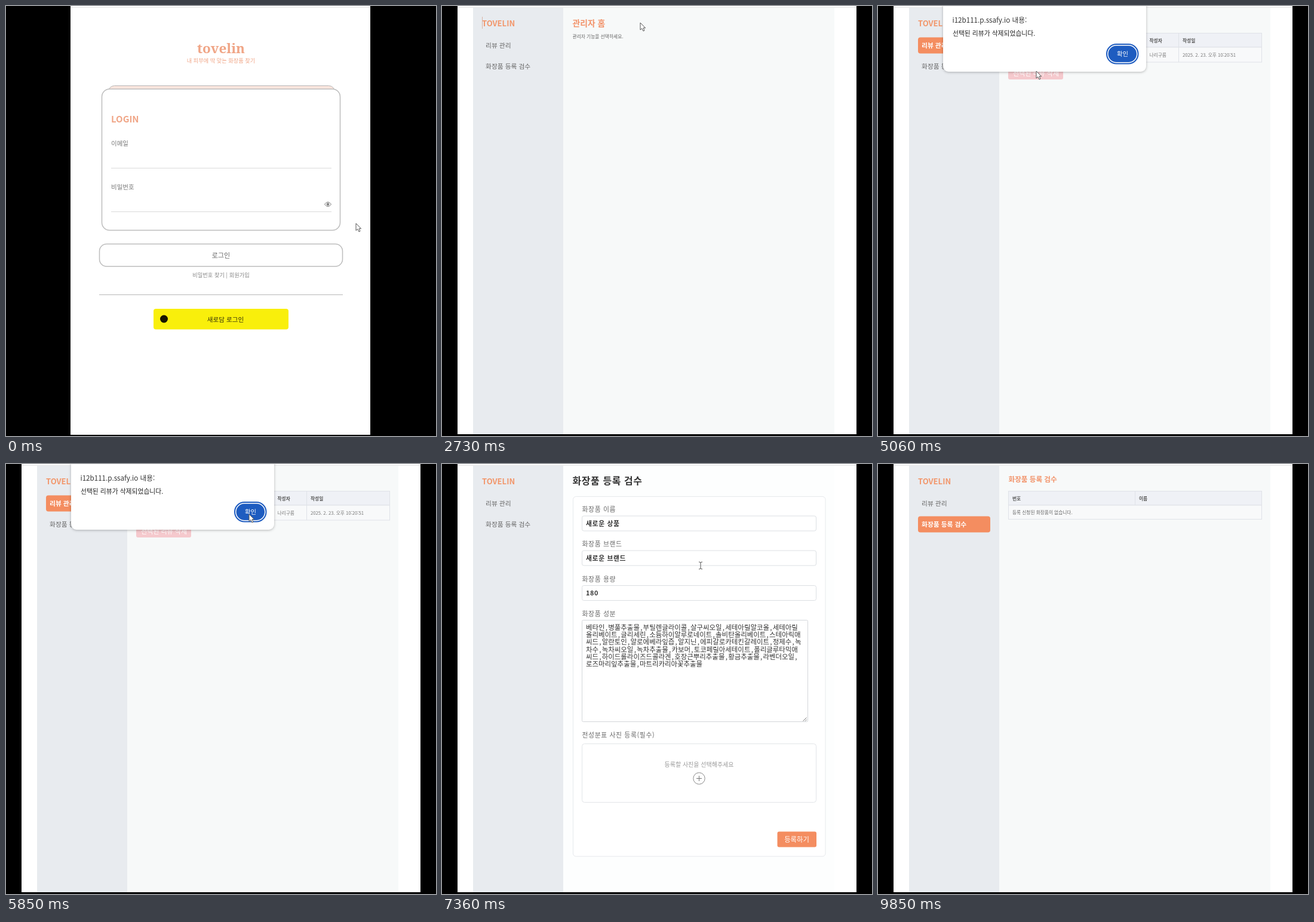
An HTML page that plays this animation: 720x720 px, repeating every 9.91 s.

```html
<!DOCTYPE html>
<html lang="ko">
<head>
<meta charset="utf-8">
<style>
html, body { margin: 0; width: 100%; height: 100%; overflow: hidden; background: #000; }
svg { display: block; width: 100vw; height: 100vh; }
text { font-family: "Noto Sans CJK KR", "Noto Sans CJK", "Noto Sans", sans-serif; white-space: pre; }
.logo { font-family: "Noto Serif", serif; font-weight: 900; }
.mono { font-family: "Noto Sans Mono CJK KR", "Noto Sans CJK KR", monospace; }
.b { font-weight: 700; }
.m { font-weight: 500; }
.c { text-anchor: middle; }
.wide { letter-spacing: .65px; }
.dialog { filter: drop-shadow(0 1px 2px #0004); }
</style>
</head>
<body>
<svg viewBox="0 0 720 720">
  <g id="page"></g>
  <g id="cursor"></g>
</svg>
<script>
const LOOP = 9910;
const ORANGE = '#f48d60', PEACH = '#f0a586', GRAY = '#bdbdbd', EDGE = '#dfe2e8';
const EMAIL = 'guest@mail.test';
const INGREDIENTS = [
  '베타인,병풀추출물,부틸렌글라이콜,살구씨오일,세테아릴알코올,세테아릴',
  '올리베이트,글리세린,소듐하이알루로네이트,솔비탄올리베이트,스테아릭애',
  '씨드,알란토인,알로에베라잎즙,알지닌,에피갈로카테킨갈레이트,정제수,녹',
  '차수,녹차씨오일,녹차추출물,카보머,토코페릴아세테이트,폴리글루타믹애',
  '씨드,하이드롤라이즈드콜라겐,호장근뿌리추출물,황금추출물,라벤더오일,',
  '로즈마리잎추출물,마트리카리아꽃추출물'
];
// time, x, y of the pointer tip
const TRACK = [
  [0, 586, 364], [55, 586, 364], [60, 579, 362], [290, 579, 362], [440, 339, 264],
  [2310, 339, 264], [2700, 332, 28], [2760, 332, 28], [3080, 105, 62], [3280, 105, 62],
  [3840, 228, 80], [4200, 228, 80], [4600, 265, 109], [5080, 265, 109], [5650, 407, 84],
  [6020, 407, 84], [6420, 110, 97], [6640, 110, 97], [6940, 300, 78], [7080, 300, 78],
  [7340, 433, 170], [7650, 433, 170], [8540, 594, 624], [9150, 594, 624], [9680, 700, 600], [LOOP, 700, 600]
];

const text = (x, y, size, str, fill = '#666', cls = '') =>
  `<text x="${x}" y="${y}" font-size="${size}" fill="${fill}" class="${cls}">${str}</text>`;
const rect = (x, y, w, h, fill, stroke = 'none', rx = 0, more = '') =>
  `<rect x="${x}" y="${y}" width="${w}" height="${h}" fill="${fill}" stroke="${stroke}" rx="${rx}" ${more}/>`;
const path = (d, stroke, fill = 'none', width = 1) =>
  `<path d="${d}" stroke="${stroke}" fill="${fill}" stroke-width="${width}"/>`;

const measure = document.createElement('canvas').getContext('2d');
measure.font = '500 9.8px "Noto Sans CJK KR", "Noto Sans CJK", "Noto Sans", sans-serif';

function login(t) {
  const count = t < 850 ? 0 : t < 1860 ? Math.min(8, Math.floor((t - 850) / 110) + 1) : EMAIL.length;
  const typed = EMAIL.slice(0, count);
  const dots = Math.max(0, Math.min(8, Math.floor((t - 1890) / 30)));
  let caret = '';
  if (t < 60) caret = path('M375.5 412v11', '#555');
  else if (t > 440 && t < 1890 && (t < 700 || t >= 850)) {
    const x = 176.5 + measure.measureText(typed).width;
    caret = path(`M${x} 252v12`, '#222');
  } else if (t >= 1890) caret = path(`M${176.5 + dots * 5.6} 326v12`, '#222');
  let bullets = '';
  for (let i = 0; i < dots; i++) bullets += `<circle cx="${179 + i * 5.6}" cy="332" r="2" fill="#333"/>`;
  return rect(108, 0, 502, 718, '#fff') + path('M108 2.5H610', '#e2e2e2') +
    text(360, 79, 22.5, 'tovelin', PEACH, 'logo c') +
    text(360, 94.5, 9.2, '내 피부에 딱 맞는 화장품 찾기', PEACH, 'm c') +
    rect(171.5, 133.5, 379, 40, '#fde6de', '#b5b5b5', 10) +
    rect(160.5, 139, 399, 236.5, '#fff', GRAY, 13, 'stroke-width="1.5"') +
    text(176, 195, 15, 'LOGIN', PEACH, 'b') +
    text(176, 234, 10.5, '이메일', '#777', 'm') +
    text(176, 306.5, 10.5, '비밀번호', '#777', 'm') +
    text(176, 261.5, 9.8, typed, '#222', 'm') + bullets + caret +
    path('M176 271.5H545M176 344.5H545', '#dadada') +
    path('M533.5 332Q539 324.5 544.5 332Q539 339.5 533.5 332Z', '#777') +
    '<circle cx="539" cy="332" r="1.8" fill="#999" stroke="#666"/>' +
    rect(156.5, 398.5, 407, 37.5, '#fff', GRAY, 12, 'stroke-width="1.5"') +
    text(360, 421.5, 11, '로그인', '#666', 'c') +
    text(360, 454, 9.25, '비밀번호 찾기 | 회원가입', '#888', 'c') +
    path('M156 483.5H564', '#b8b8b8') +
    rect(247, 507, 226, 34.5, '#f9ef0b', 'none', 4) +
    '<circle cx="264.5" cy="524" r="6.5" fill="#181600"/>' +
    text(367.5, 528.5, 10.6, '새로담 로그인', '#33300a', 'm c');
}

function frame(active) {
  const item = (i, label) => {
    const on = i === active, y = 52.5 + i * 35;
    return (on ? rect(67, y, 121, 27, ORANGE, 'none', 4) : '') +
      text(73, y + 17.5, 10.75, label, on ? '#fff' : '#666', on ? 'b' : 'm');
  };
  return rect(26, 0, 668, 717, '#fff') + rect(52, 3, 151, 714, '#e8ebef') +
    rect(203, 3, 454, 714, '#f7f9f9') + path('M26 2.5H694', '#e2e2e2') +
    text(67, 33.5, 13, 'TOVELIN', '#f2976c', 'b') +
    item(0, '리뷰 관리') + item(1, '화장품 등록 검수');
}

const home = () => frame(-1) + path('M67.5 18V38', '#d9b3a6') +
  text(218.5, 33.5, 13.8, '관리자 홈', '#f2936a', 'b') +
  text(218.5, 54, 7.75, '관리자 기능을 선택하세요.');

// columns: [text x, heading, value]
function table(cols, rowHeight, note) {
  let s = rect(218.5, 45.5, 424, 23.5, '#eff1f6', EDGE) + rect(218.5, 69, 424, rowHeight, '#f8f9fa', EDGE);
  cols.forEach(([x, head, value], i) => {
    if (i) s += path(`M${x - 6.5} 45.5V${note ? 69 : 69 + rowHeight}`, EDGE);
    s += text(x, 60.5, 7.7, head, '#555', 'b') + (note ? '' : text(x, 84.5, 7.7, value, '#777'));
  });
  return s + (note ? text(225, 84, 7.7, note) : '');
}

function review(t) {
  const open = t >= 5000 && t < 5980, gone = t >= 5980;
  const checked = t >= 4100 && t < 5000;
  const box = (y, on) => rect(225.5, y, 9.5, 9.5, on ? '#2468c8' : '#fff', on ? '#2468c8' : '#777', 2) +
    (on ? path(`M227.5 ${y + 5}l2 2l4-5`, '#fff', 'none', 1.4) : '');
  const cols = [[225, '', ''], [255, 'ID', '47'], [284, '내용', '이거 그냥 별로야 별로'], [397, '신고 횟수', '5'],
    [454.5, '작성자', '나리구름'], [510, '작성일', '2025. 2. 23. 오후 10:20:51']];
  let s = frame(0) + text(218.5, 30, 11.7, '리뷰 관리 (5회 이상 신고)', '#4f80cc', 'b') +
    table(cols, 25, gone && '신고된 리뷰가 없습니다.') +
    box(52, checked) + (gone ? '' : box(76.5, checked)) +
    rect(218, 102, 92, 21, t < 5000 ? '#c8203f' : '#f5c9cd', 'none', 3) +
    text(226, 116.5, 11, '선택된 리뷰 삭제', '#fff');
  if (open) s += `<g class="dialog">${rect(109, -12, 340, 122, '#fff', 'none', 9)}</g>` +
    text(124.5, 28, 11.6, 'i12b111.p.ssafy.io 내용:', '#333') +
    text(125, 50, 10.8, '선택된 리뷰가 삭제되었습니다.', '#222') +
    rect(383, 64, 52.5, 32.5, '#fff', '#1e5cc0', 16.2, 'stroke-width="2"') +
    rect(385.5, 66.5, 47.5, 27.5, '#1e5cc0', 'none', 13.7) +
    text(409.5, 83.5, 10.3, '확인', '#fff', 'c');
  return s;
}

const list = empty => frame(1) + text(218.5, 30, 11.6, '화장품 등록 검수', '#f2936a', 'b') +
  table([[225, '번호', '1'], [437, '이름', '새로운 상품']], 23.5, empty && '등록 신청된 화장품이 없습니다.');

function form() {
  const field = (y, label, value) => text(234.5, y, 10.8, label, '#666', 'wide') +
    rect(234.5, y + 7, 392, 25, '#fff', '#dcdfe3', 3) + text(241, y + 23.5, 10.8, value, '#333', 'b wide');
  return frame(-1) + rect(203, 3, 454, 714, '#fdfefe') +
    text(218.5, 33.5, 15.9, '화장품 등록 검수', '#333', 'b wide') +
    rect(219.5, 54.5, 422.5, 602.5, '#fff', '#e6e9ec', 5) +
    field(80, '화장품 이름', '새로운 상품') + field(138, '화장품 브랜드', '새로운 브랜드') +
    field(196.5, '화장품 용량', '180') +
    text(234.5, 255, 10.8, '화장품 성분', '#666', 'wide') +
    rect(234.5, 261.5, 378, 170, '#fff', '#d3d6da', 2) +
    INGREDIENTS.map((line, i) => text(241, 278 + i * 12.2, 11.45, line, '#333', 'mono')).join('') +
    path('M604.5 430.5l6-6M608 430.5l2.5-2.5', '#777') +
    text(234.5, 458, 10.8, '전성분표 사진 등록(필수)', '#666', 'wide') +
    rect(234.5, 468.5, 392, 98, '#fff', '#e2e5e8', 4) +
    text(430.5, 507, 10, '등록할 사진을 선택해주세요', '#999', 'c') +
    '<circle cx="430.5" cy="526.5" r="9.7" fill="#fff" stroke="#888"/>' +
    path('M426 526.5h9M430.5 522v9', '#777') +
    rect(561.5, 615.5, 65.5, 26, ORANGE, 'none', 3) +
    text(594, 632.5, 11.3, '등록하기', '#fff', 'c');
}

function scene(t) {
  if (t < 2290) return login(t);
  if (t < 3150) return home();
  if (t < 6550) return review(t);
  if (t < 7070) return list(false);
  return t < 8790 ? form() : list(true);
}

function pointer(t) {
  const i = TRACK.findIndex(k => k[0] > t);
  const [t0, x0, y0] = TRACK[i - 1], [t1, x1, y1] = TRACK[i];
  const u = (t - t0) / (t1 - t0), e = u * u * (3 - 2 * u);
  const x = x0 + (x1 - x0) * e, y = y0 + (y1 - y0) * e;
  if (x > 685) return '';
  const beam = (t > 400 && t < 2290) || (t > 7200 && t < 8790 && y < 430);
  return `<g transform="translate(${x} ${y})">` + (beam
    ? path('M-3-6Q0-6 0-4.5Q0-6 3-6M0-5V5M-3 6Q0 6 0 4.5Q0 6 3 6', '#555')
    : path('M0 0V12L2.8 9.5L5 14L7 13L5 8.8H8.6Z', '#555', '#fff')) + '</g>';
}

const pageLayer = document.getElementById('page'), cursorLayer = document.getElementById('cursor');
let shown = '';
function draw() {
  const t = performance.now() % LOOP, next = scene(t);
  if (next !== shown) pageLayer.innerHTML = shown = next;
  cursorLayer.innerHTML = pointer(t);
  requestAnimationFrame(draw);
}
draw();
</script>
</body>
</html>
```
